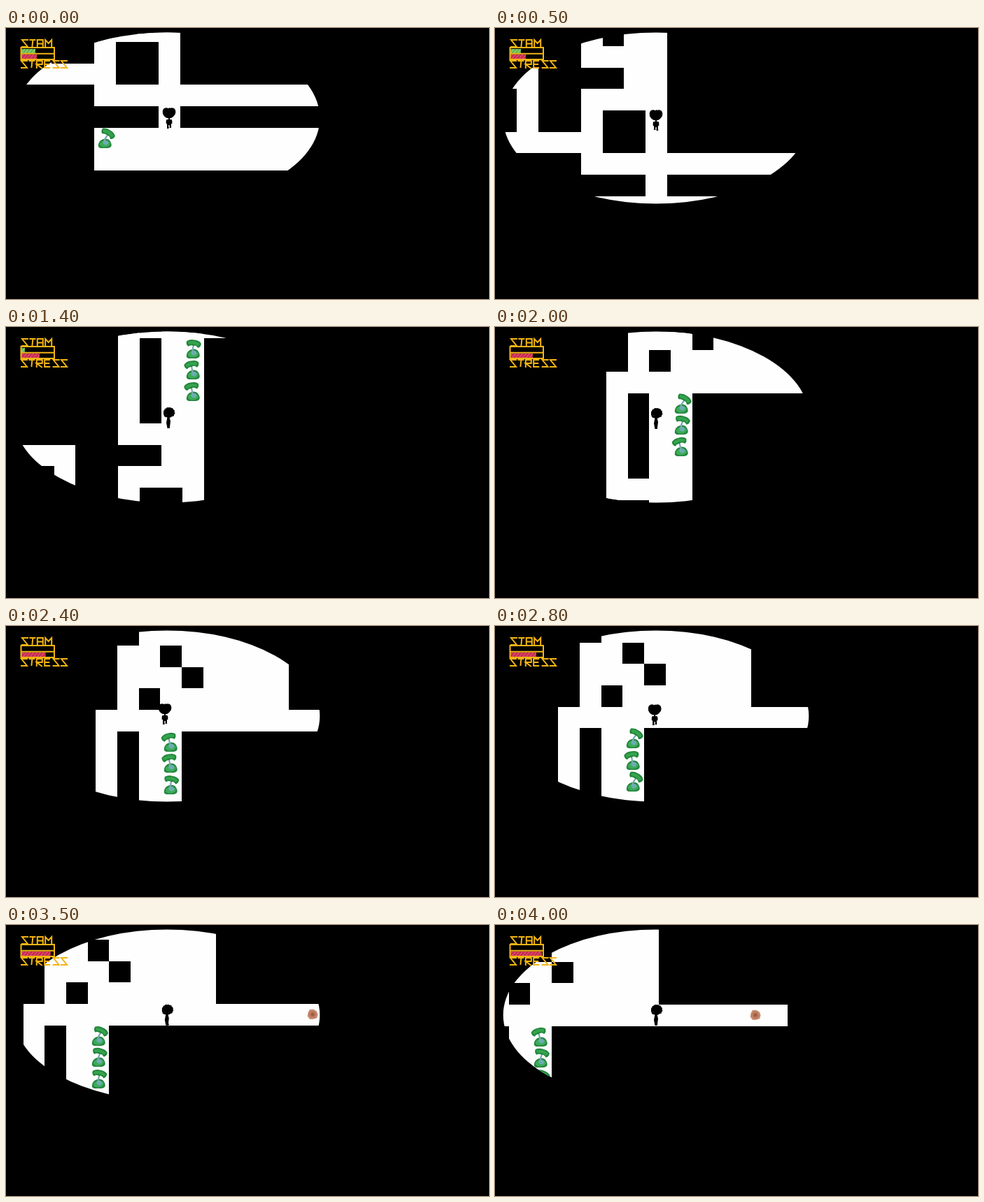
Write an HTML page with a canvas that moves like this. It is 690 px wide and 388 px high and loops after 4.1 s.

```html
<!DOCTYPE html>
<html lang="en">
<head>
<meta charset="utf-8">
<title>Maze walk</title>
<style>
  html, body { margin: 0; width: 100%; height: 100%; overflow: hidden; background: #000; }
  canvas { display: block; }
</style>
</head>
<body>
<canvas id="stage" width="690" height="388" aria-label="Maze game with STAM and STRESS meters"></canvas>
<script>
const ctx = document.getElementById('stage').getContext('2d');
const LOOP = 4100, STEP = 100, TILE = 30.63, TAU = Math.PI * 2;
const GOLD = '#f3b413';

// Open floor: column, row, width, height in tiles
const floor = [
  [0, 4, 12, 2], [0, 2, 12, 1], [3, -10, 1, 14], [-8, 1, 9, 1], [0, -1, 1, 3],
  [0, -1, 4, 1], [2, -8, 1, 8], [0, -3, 4, 1], [0, -8, 1, 6], [0, -8, 15, 1],
  [1, -9, 1, 1], [3, -9, 6, 1], [1, -10, 3, 1], [5, -10, 4, 1], [1, -11, 2, 1],
  [4, -11, 5, 1], [2, -13, 7, 2], [-3, -2, 1, 4], [-8, -2, 6, 1]
];

// Column, row, sway period, time of the rightmost sway
const plants = [[0, 4, 800, 0], [3, -7, 800, 2000], [3, -6, 500, 3100], [3, -5, 550, 1725]];

// Time, map origin x and y, player x, player feet y
const walk = [
  [0, 126, 20, 233, 144], [500, 123.2, 118, 230, 147], [600, 123.2, 130.5, 230, 147],
  [900, 125, 174, 230, 147], [1200, 150, 216.5, 231, 146], [1400, 160.4, 230, 232, 145],
  [1800, 160, 269.5, 231, 146], [2000, 159, 309, 230, 146], [2400, 128.4, 365, 227, 141],
  [3100, 62, 357.5, 229, 143], [3600, 15.5, 358.3, 230, 144], [4000, -41.5, 359, 230, 144]
];

// Time, right end of each meter
const stamina = [[0, 42], [500, 37], [1400, 27], [1900, 22], [4000, 22]];
const stress = [[0, 44], [500, 44], [1400, 48], [2000, 54], [3100, 61], [4000, 67]];

function at(keys, t) {
  let i = 1;
  while (i < keys.length - 1 && keys[i][0] < t) i++;
  const a = keys[i - 1], b = keys[i], k = (t - a[0]) / (b[0] - a[0]);
  return a.slice(1).map((v, n) => v + (b[n + 1] - v) * k);
}

function oval(x, y, rx, ry, color, turn = 0) {
  ctx.fillStyle = color;
  ctx.beginPath();
  ctx.ellipse(x, y, rx, ry, turn, 0, TAU);
  ctx.fill();
}

function shape(path, color) {
  ctx.fillStyle = color;
  ctx.fill(new Path2D(path));
}

function drawPlant(x, y, sway) {
  const capX = 0.8 + 3.8 * sway;
  ctx.save();
  ctx.translate(x + 15.3, y + 22);
  shape('M-9.5 3 Q-9 -4 -2 -6 Q6 -8 9 0 Q11 6 4 7 L-6 7 Q-10 6 -9.5 3Z', '#258741');
  oval(0, 1, 7.5, 4.5, '#3daa58', -0.1);
  oval(1, -1, 4, 3.4, '#68aeb0', 0.3);
  ctx.strokeStyle = '#76aaae';
  ctx.lineWidth = 2.2;
  ctx.beginPath();
  ctx.moveTo(-1, -1);
  ctx.quadraticCurveTo(-1, -7, capX, -12);
  ctx.stroke();
  ctx.translate(capX, -14);
  ctx.rotate(0.16 + 0.42 * sway);
  shape('M-10.5 -2 Q-6 -6 0 -5.5 Q7 -6 10.5 -2 Q11 3 7 5 Q3 1 0 3 Q-4 2 -7 5 Q-11 3 -10.5 -2Z', '#21863b');
  shape('M-8.5 -1.5 Q0 -6 8.5 -1.5 Q8 2 6 2 Q0 -1 -6 2 Q-9 1 -8.5 -1.5Z', '#35a34e');
  ctx.restore();
}

function drawRock(x, y) {
  const shade = ctx.createRadialGradient(x, y, 0, x, y, 8);
  shade.addColorStop(0, '#8f5038');
  shade.addColorStop(0.4, '#b87458');
  shade.addColorStop(1, '#cf9a80');
  ctx.fillStyle = shade;
  ctx.beginPath();
  for (let i = 0; i < 9; i++) {
    const a = i / 9 * TAU, r = 7.6 + 0.7 * Math.sin(i * 2.3);
    ctx.lineTo(x + r * Math.cos(a), y + r * Math.sin(a));
  }
  ctx.fill();
}

function drawPlayer(x, feet, side, t) {
  const stride = t / STEP % 2 ? 1 : 0;
  ctx.save();
  ctx.translate(x, feet - 30);
  if (side) {
    oval(0.5, 8, 7, 7, '#000');
    for (let i = 0; i < 9; i++) {
      const a = 2.9 + i * 0.5;
      oval(1 + 6 * Math.cos(a), 7.5 + 5.5 * Math.sin(a), 2.3, 2.2, '#000');
    }
    oval(-3.5, 10, 3, 4, '#000');
    oval(-3, 10.5, 0.7, 0.5, '#444');
    shape('M-1.5 14 H1.5 L3 20 L1.8 30 H-1.5 L-3 22Z', '#000');
    if (stride) shape('M0 24 L3.5 29 L1 30Z', '#000');
  } else {
    shape('M0 2 Q3 -1 7 1 Q10 3 9 8 Q7 13 3 15 H-3 Q-8 13 -9 8 Q-10 3 -7 1 Q-3 -1 0 2Z', '#000');
    for (let i = 0; i < 11; i++) {
      const a = 2.4 + i * 0.48;
      oval(7.5 * Math.cos(a), 7 + 5 * Math.sin(a), 1.8, 1.7, '#000');
    }
    shape('M-1 13 H1 V17 Q4 16 4.3 19 V23 H3 V29 H0.7 V25 H-0.7 V29 H-3 V23 H-4.3 V19 Q-4 16 -1 17Z', '#000');
    ctx.fillRect(stride ? 0.7 : -3, 28, 2.5, 2);
  }
  ctx.restore();
}

const glyphs = {
  S: 'M10 0 H1 L9 10 H0',
  T: 'M0 0 H9 M5 0 L4 10',
  A: 'M0 11 V0 H8 V11 M0 5.5 H8',
  M: 'M0 11 V0 L4.5 5 L9 0 V11',
  R: 'M0 11 V0 H8 V5 H0 L8 11',
  E: 'M8 0 H0 V10 H8 M0 5 H7'
};

function letter(text, x, y) {
  [...text].forEach((c, i) => {
    ctx.save();
    ctx.translate(x + i * 11.4, y);
    ctx.stroke(new Path2D(glyphs[c]));
    ctx.restore();
  });
}

function meter(right, y, color, hatch) {
  if (right <= 22) return;
  ctx.save();
  ctx.beginPath();
  ctx.rect(22, y, right - 22, 6);
  ctx.clip();
  ctx.fillStyle = color;
  ctx.fillRect(22, y, 50, 6);
  ctx.strokeStyle = hatch;
  ctx.lineWidth = 1;
  ctx.beginPath();
  for (let x = 22; x < 70; x += 5) {
    ctx.moveTo(x, y + 6);
    ctx.lineTo(x + 5, y);
  }
  ctx.stroke();
  ctx.restore();
}

function drawHud(t) {
  ctx.fillStyle = '#000';
  ctx.fillRect(21, 28, 48, 17);
  meter(at(stamina, t)[0], 30, '#62b64c', '#b5dda0');
  meter(at(stress, t)[0], 38, '#dc3f62', '#8e1c42');
  ctx.strokeStyle = GOLD;
  ctx.lineWidth = 2;
  ctx.strokeRect(21.5, 28, 47.5, 17);
  ctx.beginPath();
  ctx.moveTo(21, 36.8);
  ctx.lineTo(69, 36.8);
  ctx.stroke();
  letter('STAM', 22, 17);
  letter('STRESS', 21, 47);
}

function draw(t) {
  const [ox, oy, px, feet] = at(walk, t);
  const tx = c => Math.round(ox + c * TILE), ty = r => Math.round(oy + r * TILE);
  ctx.fillStyle = '#000';
  ctx.fillRect(0, 0, 690, 388);

  ctx.save();
  ctx.beginPath();
  ctx.ellipse(230, 129, 218.3, 122.5, 0, 0, TAU);
  ctx.clip();
  ctx.fillStyle = '#fefefe';
  for (const [c, r, w, h] of floor) {
    ctx.fillRect(tx(c), ty(r), tx(c + w) - tx(c), ty(r + h) - ty(r));
  }
  for (const [c, r, period, peak] of plants) {
    drawPlant(tx(c), ty(r), Math.cos((t - peak) / period * TAU));
  }
  drawRock(tx(13.5), ty(-7.5));
  ctx.restore();

  const side = t >= 1100 && t < 2200 || t >= 3400;
  drawPlayer(px, feet, side, t);
  drawHud(t);
}

const start = performance.now();
function tick() {
  const t = (performance.now() - start) % LOOP;
  draw(Math.floor(t / STEP) * STEP);
  requestAnimationFrame(tick);
}
tick();
</script>
</body>
</html>
```
